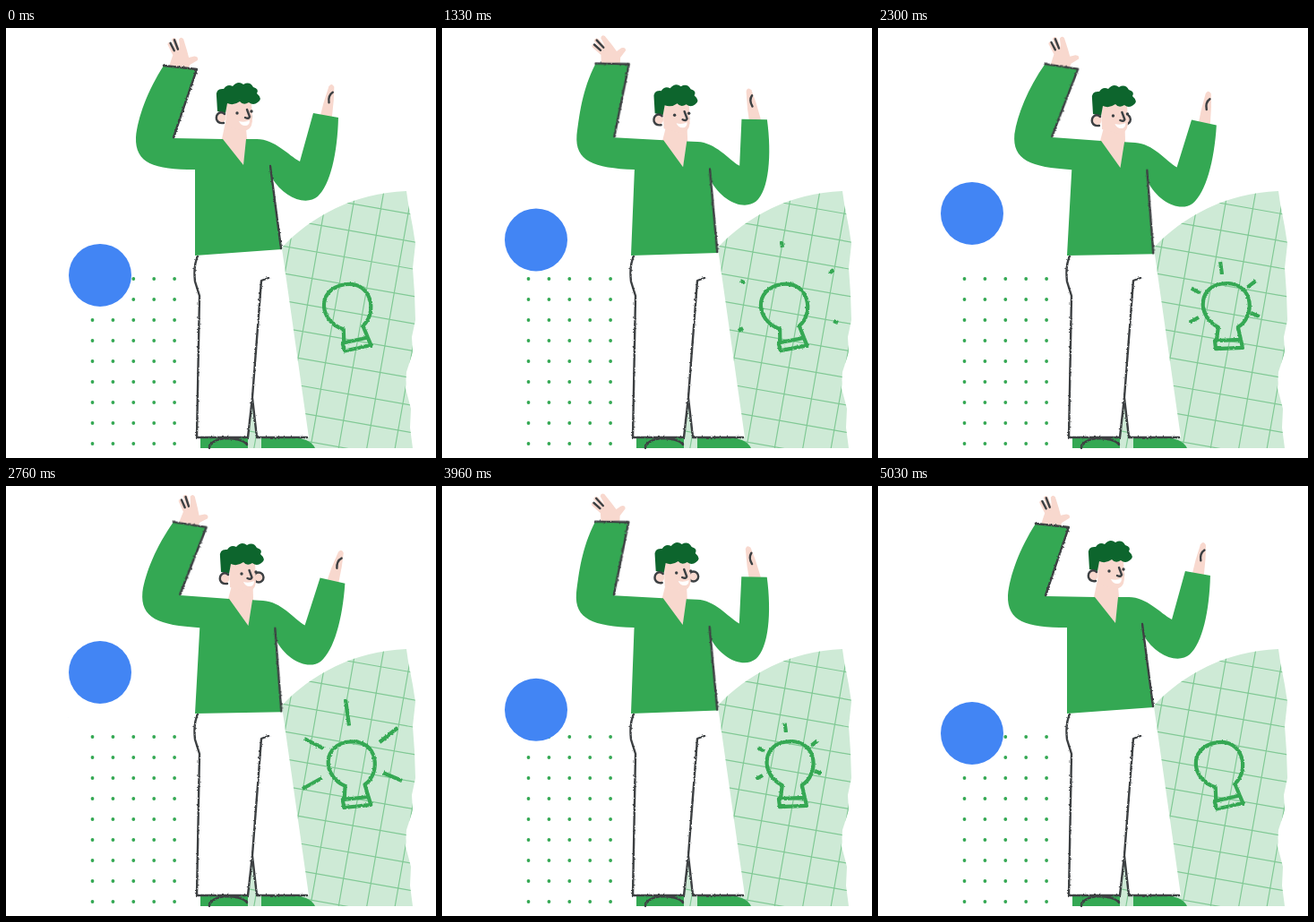
An HTML page that plays this animation: 480 by 480 pixels, repeating every 5060 ms.

```html
<!DOCTYPE html>
<html lang="en">
<head>
<meta charset="utf-8">
<title>Waving developer</title>
<style>
html, body { margin: 0; width: 100%; height: 100%; overflow: hidden; background: #fff; }
svg { display: block; width: 100vw; height: 100vh; }
.ink { fill: none; stroke: #3c4043; stroke-width: 2.4; stroke-linecap: round; stroke-linejoin: round; }
.chalk { fill: none; stroke: #34a853; stroke-width: 4.2; stroke-linejoin: round; }
.skin { fill: #f8d8ce; }
.green { fill: #34a853; }
</style>
</head>
<body>
<svg viewBox="0 0 480 480">
  <defs>
    <filter id="rough" filterUnits="userSpaceOnUse" x="0" y="0" width="480" height="480">
      <feTurbulence type="fractalNoise" baseFrequency=".4" numOctaves="2" seed="4"/>
      <feDisplacementMap in="SourceGraphic" scale="2.6" xChannelSelector="R" yChannelSelector="G"/>
    </filter>
    <path id="sheet" d="M268 469V300L308 245C340 211 388 184 447 182L449 196L454 222L457 241L454 268L456 296L457 326L453 345L454 362L447 384L446 402L452 425L451 446L454 469Z"/>
    <clipPath id="sheetClip"><use href="#sheet"/></clipPath>
  </defs>

  <use href="#sheet" fill="#ceead6"/>
  <g clip-path="url(#sheetClip)">
    <path id="grid" transform="translate(421 187) rotate(10)" stroke="#81c995" stroke-width="1.2"/>
  </g>
  <g filter="url(#rough)">
    <path id="rays" class="chalk" stroke-width="5"/>
    <path id="bulb" class="chalk" d="M378 348L380 334C355 321 357 285 390 285C421 286 421 323 402 334L405 348M376 349L405 348L407 357L377 358Z"/>
  </g>

  <path fill="#fff" d="M213 253L308 246L338 457H280L275 414L270 457H214L216 300L210 280Z"/>
  <path class="green" d="M217 457H270V469H217ZM285 457H324Q341 460 345 469H285Z"/>
  <g filter="url(#rough)">
    <path class="ink" d="M214 255Q209 265 211 283L216 299L213 457H270L275 412L285 282L293 279M275 413L280 457H336M227 469C226 456 262 455 269 465"/>
  </g>

  <g id="dots" class="green"></g>
  <circle id="badge" cx="105" r="35" fill="#4285f4"/>

  <g id="body">
    <path class="skin" d="M246 100H267L269 124L265 154L241 124Z"/>
    <g id="leftHand">
      <path class="skin" d="M182 44L185 31L178 20Q178 16 182 18L186 23L182 14Q184 10 187 13L192 23L190 13Q192 9 195 12L200 24L203 32L209 30Q214 30 213 34L205 40L203 46Z"/>
      <path class="ink" stroke-width="1.6" d="M181 18L186 26M185 14L190 24"/>
    </g>
    <g id="rightHand">
      <path class="skin" d="M351 98L353 84L357 65Q360 60 363 65L364 80L364 100Z"/>
      <path class="ink" stroke-width="1.6" d="M362 71Q357 75 359 83"/>
    </g>
    <path id="sweater" class="green"/>
    <g filter="url(#rough)">
      <path id="sleeve" class="ink"/>
      <path class="ink" d="M295 154L307 246"/>
    </g>
  </g>

  <g id="head">
    <circle id="farEar" class="skin" cy="99" r="5.5" stroke="#3c4043" stroke-width="2.4"/>
    <path class="skin" d="M245 82H274L275 104Q274 115 264 115L246 110Z"/>
    <path fill="#0d652d" d="M236 93L235 76Q234 67 243 68Q247 62 253 65Q259 58 265 63Q272 59 276 66Q283 68 280 73Q287 79 281 83Q276 87 271 83Q265 87 261 82Q254 87 247 84L245 95Z"/>
    <circle class="skin" cx="240" cy="100" r="5.5"/>
    <path class="ink" d="M244 96C239 92 234 96 235 102Q237 107 243 106"/>
    <g id="face">
      <circle cx="258" cy="95" r="1.7" fill="#3c4043"/>
      <circle cx="274" cy="93" r="1.7" fill="#3c4043"/>
      <path id="nose" class="ink" stroke-width="2" d="M269 91L272 99Q271 102 267 100"/>
      <path fill="#fff" d="M260 104Q266 106 272 103Q272 109 267 109Q262 109 260 104Z"/>
    </g>
  </g>
</svg>
<script>
const LOOP = 5060, TAU = Math.PI * 2;
const $ = id => document.getElementById(id);
const set = (id, name, value) => $(id).setAttribute(name, value);
const wave = (t, period, shift) => Math.cos(TAU * (t - shift) / period);
const ease = (t, from, to) => {
  const k = Math.min(1, Math.max(0, (t - from) / (to - from)));
  return k * k * (3 - 2 * k);
};
const deg = a => a * 180 / Math.PI;
const turn = ([x, y], [cx, cy], a) => {
  const c = Math.cos(a), s = Math.sin(a), dx = x - cx, dy = y - cy;
  return [cx + dx * c - dy * s, cy + dx * s + dy * c];
};

// Inner and outer end of each light ray
const RAYS = [
  [384, 275, 379, 238], [412, 290, 437, 270], [416, 318, 442, 329],
  [360, 296, 333, 282], [358, 323, 331, 338]
];
const LEFT_ELBOW = [165, 140], RIGHT_ELBOW = [345, 170];

let lines = '';
for (let i = -12; i <= 12; i++) lines += `M${i * 31} -400V400M-400 ${i * 30 + 15}H400`;
set('grid', 'd', lines);

for (let i = 0; i < 45; i++) {
  const dot = document.createElementNS('http://www.w3.org/2000/svg', 'circle');
  dot.setAttribute('cx', 96.5 + i % 5 * 22.9);
  dot.setAttribute('cy', 280 + Math.floor(i / 5) * 23);
  dot.setAttribute('r', 1.9);
  $('dots').append(dot);
}

function drawBulb(t) {
  const period = LOOP / 3, p = t % period;
  set('bulb', 'transform', `rotate(${-5.5 * (1 + wave(t, period, -130))} 391 353)`);
  const outer = ease(p, 460, 830);
  const inner = .2 * ease(p, 600, 950) + .8 * ease(p, 1070, 1450);
  const point = ([x, y, u, v], k) => `${x + (u - x) * k} ${y + (v - y) * k}`;
  set('rays', 'd', outer > inner
    ? RAYS.map(r => `M${point(r, inner)}L${point(r, outer)}`).join('') : '');
}

function drawBody(t, lean) {
  const half = LOOP / 2;
  const sway = wave(t, half, 30) - 1;
  const left = .067 * sway, right = .1 * sway;
  const a = turn([176, 42], LEFT_ELBOW, left), b = turn([213, 46], LEFT_ELBOW, left);
  const c = turn([343, 95], RIGHT_ELBOW, right), d = turn([371, 100], RIGHT_ELBOW, right);
  const a2 = turn([158, 70], LEFT_ELBOW, left), d2 = turn([370, 140], RIGHT_ELBOW, right);
  set('body', 'transform', `rotate(${deg(.055 * lean)} 211 254)`);
  set('sweater', 'd', `M242 124L187 123L${b}L${a}C${a2} 147 100 145 122C144 151 165 158 211 158
    V254L308 247L296 166C310 190 335 199 348 188C362 175 ${d2} ${d}L${c}L328 149
    C315 142 300 124 280 124H268L265 153Z`);
  set('sleeve', 'd', `M${a}L${b}L187 122`);
  const leftBend = -.04 + .15 * wave(t, half, 170);
  const rightBend = .16 * wave(t, half, 350);
  set('leftHand', 'transform',
    `rotate(${deg(left)} ${LEFT_ELBOW}) rotate(${deg(leftBend)} 194 44)`);
  set('rightHand', 'transform',
    `rotate(${deg(right)} ${RIGHT_ELBOW}) rotate(${deg(rightBend)} 357 98)`);
}

function drawHead(t, lean) {
  const dip = ease(t, 0, 800) - ease(t, 800, 1700);
  const front = ease(t, 2050, 2600) - ease(t, 4150, 4800);
  set('head', 'transform', `translate(${4 * lean - 3.6 * dip} ${3 * lean})`);
  set('farEar', 'cx', 268 + 10 * front);
  set('face', 'transform', `translate(${front} 0)`);
  set('nose', 'transform', `translate(${-2.5 * front} 0)`);
}

function frame(now) {
  const t = now % LOOP;
  const lean = ease(t, 300, 1850) - ease(t, 3280, LOOP);
  set('badge', 'cy', 241 + 35 * wave(t, LOOP, -40));
  drawBulb(t);
  drawBody(t, lean);
  drawHead(t, lean);
}

const start = performance.now();
(function tick() {
  frame(performance.now() - start);
  requestAnimationFrame(tick);
})();
</script>
</body>
</html>
```
